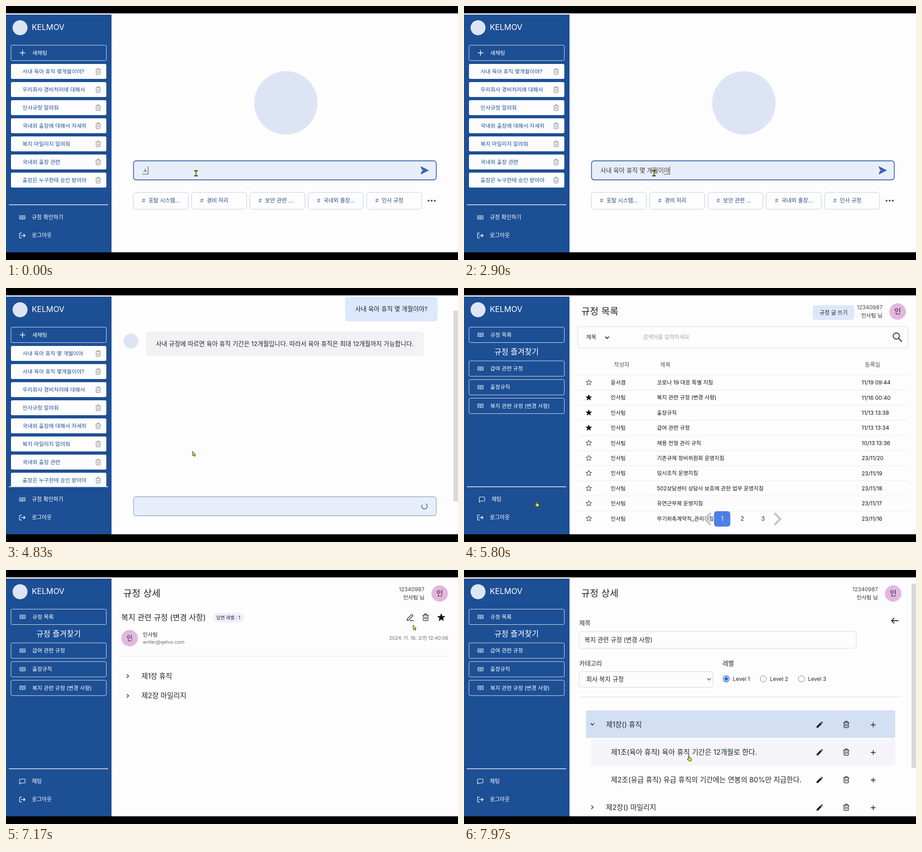
Animation, 998 px wide and 561 px high, one loop 8000 ms. Source, as an HTML page:

```html
<!DOCTYPE html>
<html lang="ko">
<head>
<meta charset="utf-8">
<title>사내 규정 챗봇</title>
<style>
  html, body { margin: 0; width: 100%; height: 100%; overflow: hidden; background: #000; }
  svg { display: block; width: 100vw; height: 100vh; }
  text { font-family: Inter, "Noto Sans CJK KR", "Noto Sans CJK JP", "Noto Sans CJK", sans-serif; white-space: pre; }
</style>
</head>
<body>
<svg id="stage" viewBox="0 0 998 561" xmlns="http://www.w3.org/2000/svg"></svg>
<script>
const LOOP = 8000, BLUE = '#1d4f95', INK = '#23262d', PALE = '#dde5f5';

// ---------- drawing helpers ----------
const T = (x, cy, size, str, more = '') =>
  `<text x="${x}" y="${(cy + size * 0.36).toFixed(2)}" font-size="${size}" ${more}>${str}</text>`;
const R = (x, y, x2, y2, r, more) =>
  `<rect x="${x}" y="${y}" width="${x2 - x}" height="${y2 - y}" rx="${r}" ${more}/>`;
const G = (id, body, more = '') => `<g id="${id}" ${more}>${body}</g>`;
const P = (d, color, w = 1.3, more = '') =>
  `<path d="${d}" fill="none" stroke="${color}" stroke-width="${w}" stroke-linecap="round" stroke-linejoin="round" ${more}/>`;
const at = (x, y, body, k = 1) => `<g transform="translate(${x} ${y}) scale(${k})">${body}</g>`;
const dot = (x, y, r, color) => `<circle cx="${x}" cy="${y}" r="${r}" fill="${color}"/>`;
const rule = (x, x2, y, color) => P(`M${x} ${y}H${x2}`, color, 1);

// ---------- icons, centred on the given point ----------
const trash = (x, y, color, k = 1) => at(x, y,
  P('M-5.5 -4H5.5M-2 -4V-6.3H2V-4M-4.4 -4V5Q-4.4 6.4 -3 6.4H3Q4.4 6.4 4.4 5V-4M-1.5 -1V3.5M1.5 -1V3.5', color, 1.2), k);
const book = (x, y) => at(x, y,
  P('M0 -3.6Q-3 -4.6 -6 -4V3.6Q-3 3 0 4Q3 3 6 3.6V-4Q3 -4.6 0 -3.6V4M-4.4 -1.7H-1.6M-4.4 .6H-1.6M1.6 -1.7H4.4M1.6 .6H4.4', '#dfe8f5', 1.1));
const plus = (x, y, color, r, w) => P(`M${x - r} ${y}h${2 * r}M${x} ${y - r}v${2 * r}`, color, w);
const logout = at(36, 507, P('M-2 -5.5H-4.5Q-6 -5.5 -6 -4V4Q-6 5.5 -4.5 5.5H-2M-2 0H6M3.2 -3L6.2 0L3.2 3', '#fff', 1.3));
const bubble = at(36, 467, P('M-6 6V-4Q-6 -5.5 -4.5 -5.5H4.5Q6 -5.5 6 -4V2Q6 3.5 4.5 3.5H-3.5Z', '#fff', 1.1));
const send = (x, y) => at(x, y, '<path d="M-8 -8.5L9 0L-8 8.5L-5.2 1.3L2 0L-5.2 -1.3Z" fill="#3f62ab" stroke="#3f62ab" stroke-linejoin="round"/>');
const starPath = Array.from({ length: 10 }, (_, i) => {
  const r = i % 2 ? 2.8 : 6.6, a = i * Math.PI / 5 - Math.PI / 2;
  return (i ? 'L' : 'M') + (r * Math.cos(a)).toFixed(2) + ' ' + (r * Math.sin(a)).toFixed(2);
}).join('') + 'Z';
const star = (x, y, full, k = 1) => at(x, y,
  `<path d="${starPath}" fill="${full ? '#111' : 'none'}" stroke="#222" stroke-width="1" stroke-linejoin="round"/>`, k);
const pencil = (x, y) => at(x, y,
  '<path d="M-6.5 6.5V3.5L2.2 -5.2L5.2 -2.2L-3.5 6.5ZM3.2 -6.2L4.4 -7.2Q5 -7.5 5.6 -7L7 -5.6Q7.5 -5 7.1 -4.4L6.1 -3.2Z" fill="#16181d"/>');
const pen = (x, y) => at(x, y, P('M-6.5 6.5L-5.6 2.6L3 -6Q4.4 -7.2 5.7 -5.9Q7 -4.6 5.8 -3.2L-2.7 5.4ZM0 6.8H7.5', INK, 1.4));
const arrowR = (x, y) => P(`M${x - 2} ${y - 3.5}l3.8 3.5l-3.8 3.5`, INK, 1.6);
const arrowD = (x, y, w = 1.6) => P(`M${x - 3.5} ${y - 2}l3.5 3.6l3.5 -3.6`, INK, w);

// ---------- sidebar ----------
const sideButton = (y, label, icon) =>
  R(11, y, 221.5, y + 34, 3, 'fill="none" stroke="#dbe5f4" stroke-width="1"') + icon(36.5, y + 17) + T(58, y + 17, 11.9, label);
const chats = ['사내 육아 휴직 몇 개월이야', '사내 육아 휴직 몇개월이야?', '우리회사 경비처리에 대해서', '인사규정 알려줘',
  '국내외 출장에 대해서 자세히', '복지 마일리지 알려줘', '국내외 출장 관련', '출장은 누구한테 승인 받아야'];
const chatItem = (label, i) => {
  const y = 128 + 40 * i;
  return R(11, y, 221.5, y + 33, 3, 'fill="#fdfdfe"') + T(36.5, y + 16.5, 11.9, label, `fill="${BLUE}"`) + trash(203.5, y + 16.5, '#8d8f96');
};
const side = R(0, 19, 233, 544, 0, `fill="${BLUE}"`) + dot(31, 48, 16.5, PALE) + T(57, 47, 17.3, 'KELMOV') +
  G('sideChat',
    sideButton(86.5, '새채팅', (x, y) => plus(x, y, '#fff', 5.5, 1.5)) +
    `<g clip-path="url(#listClip)">${G('history', chats.map(chatItem).join(''))}</g>` +
    G('footRules', book(36, 467) + T(57, 467, 12, '규정 확인하기'))) +
  G('sideRules',
    sideButton(86.5, '규정 목록', book) + T(116, 141, 16.9, '규정 즐겨찾기', 'text-anchor="middle"') +
    ['급여 관련 규정', '출장규칙', '복지 관련 규정 (변경 사항)'].map((s, i) => sideButton(161 + 41.2 * i, s, book)).join('') +
    G('footChat', bubble + T(57, 467, 12, '채팅'))) +
  P('M7 439H225', '#f2f5fa', 1.6) + logout + T(57, 507, 12, '로그아웃');

// ---------- pages ----------
const chip = (s, i) => {
  const x = 281 + 128.8 * i;
  return R(x, 411.5, x + 121.5, 449, 6, 'fill="#fdfdfe" stroke="#c0c9e2" stroke-width="1"') +
    T(x + 19, 430, 12, '#', 'fill="#56719f"') + T(x + 33.5, 430, 12.05, s, 'fill="#2c4a80"');
};
const home = dot(618, 214, 70, PALE) +
  R(281.5, 342, 950, 384, 6, 'fill="#e8eef9" stroke="#426aae" stroke-width="1.8"') + send(924, 363) +
  '<text id="typed" x="301" y="368" font-size="13.6" fill="#3a3d44"/>' +
  P('M0 0', '#444', 1, 'id="compose"') + P('M0 0', '#333', 1, 'id="caret"') +
  ['포탈 시스템...', '경비 처리', '보안 관련 ...', '국내외 출장...', '인사 규정'].map(chip).join('') +
  [933, 939.8, 946.6].map(x => dot(x, 430, 2.1, '#2a4d8f')).join('');

const scrollbar = (y, y2) => R(988, y, 998, y2, 0, 'fill="#d9d9da"');
const question = '사내 육아 휴직 몇 개월이야?';
const answer = '사내 규정에 따르면 육아 휴직 기간은 12개월입니다. 따라서 육아 휴직은 최대 12개월까지 가능합니다.';
const chat = scrollbar(50, 471) +
  R(749, 20, 953, 73.5, 6, 'fill="#dce8fb"') + T(771, 46.5, 13.6, question) +
  G('reply', dot(276, 117, 16.5, PALE) + R(309, 96, 400, 150, 6, 'id="replyBox" fill="#f2f2f5"') +
    T(331, 123, 13.6, '', 'id="replyText"')) +
  R(281.5, 461, 950, 503, 6, 'fill="#e8eef9" stroke="#a6bede" stroke-width="1.8"') +
  P('M4.3 -4.3A6.1 6.1 0 1 1 -4.3 -4.3', '#3f62ab', 1.6, 'id="spinner"') + G('sendChat', send(924, 482));

const user = dx => at(dx, 0, T(924, 43, 12, '12340987', 'text-anchor="end" fill="#444"') +
  T(924, 61, 11.9, '인사팀 님', 'text-anchor="end"') + dot(957.5, 52, 18.2, '#e3b6df') + T(957.5, 51.5, 16, '인', 'text-anchor="middle"'));

const HR = '인사팀';
const rows = [
  ['윤서겸', '코로나 19 대응 특별 지침', '11/19 09:44'], [HR, '복지 관련 규정 (변경 사항)', '11/16 00:40'],
  [HR, '출장규칙', '11/13 13:38'], [HR, '급여 관련 규정', '11/13 13:34'], [HR, '채용 전형 관리 규칙', '10/13 13:36'],
  [HR, '기존규제 정비위원회 운영지침', '23/11/20'], [HR, '임시조직 운영지침', '23/11/19'],
  [HR, '502상담센터 상담사 보호에 관한 업무 운영지침', '23/11/18'], [HR, '유연근무제 운영지침', '23/11/17'],
  [HR, '무기위촉계약직_관리지침', '23/11/16']];
const list = T(259, 52, 20.7, '규정 목록') + R(770, 38, 862, 70.5, 6, 'fill="#dce7f8"') + T(785, 54.5, 12, '규정 글 쓰기') + user(0) +
  R(251.5, 85, 980, 133, 5, 'fill="#fdfdfe" stroke="#d3d9e6" stroke-width="1.2"') +
  T(270, 109, 12, '제목') + arrowD(316, 110, 1.9) + T(395, 109, 12, '검색어를 입력하세요', 'fill="#a3a5aa"') +
  '<circle cx="954.5" cy="106" r="6.8" fill="none" stroke="#555" stroke-width="2.4"/>' + P('M959.8 111.3L966 117.8', '#555', 2.8) +
  T(331, 169.5, 12.4, '작성자', 'fill="#555"') + T(433, 169.5, 12.4, '제목', 'fill="#555"') + T(885, 169.5, 12.4, '등록일', 'fill="#555"') +
  rows.map(([who, title, date], i) => {
    const y = 208.8 + 33.4 * i;
    return rule(251, 980, y - 16.8, '#e9eaee') + star(275.5, y, i > 0 && i < 4) +
      T(324, y, 11.9, who, 'fill="#111"') + T(426, y, 11.9, title, 'fill="#111"') + T(878, y, 12, date, 'fill="#111"');
  }).join('') +
  P('M544.5 497L532.5 510L544.5 523', '#c8cad2', 5, 'style="stroke-linecap:butt;stroke-linejoin:miter"') +
  P('M685.5 497L698.5 510L685.5 523', '#c8cad2', 5, 'style="stroke-linecap:butt;stroke-linejoin:miter"') +
  R(552, 493, 588, 527, 6, 'fill="#4d80e6"') +
  [[570, '#fff'], [614.5, INK], [660, INK]].map(([x, c], i) => T(x, 510, 12.4, i + 1, `text-anchor="middle" fill="${c}"`)).join('');

const detail = T(259, 52, 20.7, '규정 상세') + user(0) + T(254.5, 105, 16.9, '복지 관련 규정 (변경 사항)') +
  R(457, 94.5, 525.5, 115.5, 10.5, 'fill="#eeeffa"') + T(464.5, 105, 10.1, '답변 레벨 : 1') +
  pen(892, 105) + trash(926.5, 104.5, INK, 1.15) + star(961, 105, true, 1.25) +
  dot(273, 150.5, 18.2, '#e3b6df') + T(273, 150, 13.6, '인', 'text-anchor="middle"') +
  T(302, 143, 11.9, HR) + T(302, 159, 10.7, 'writer@qelvo.com', 'fill="#696c74"') +
  T(976.5, 150, 10.7, '2024. 11. 16. 오전 12:40:06', 'text-anchor="end" fill="#696c74"') + rule(255, 976, 190.5, '#dcdde2') +
  arrowR(269, 234.5) + T(299, 234, 15.5, '제1장 휴직') + arrowR(269, 278) + T(299, 277.5, 15.5, '제2장 마일리지');

const tools = y => pencil(785, y + 1) + trash(844, y, '#16181d', 1.1) + plus(903.5, y + 1, '#16181d', 4.8, 1.5);
const radio = (x, i) => (i ? `<circle cx="${x}" cy="240.5" r="6.8" fill="#fff" stroke="#777" stroke-width="1"/>` :
  `<circle cx="${x}" cy="240.5" r="6.6" fill="#fff" stroke="#2f6fe0" stroke-width="1.6"/>` + dot(x, 240.5, 4.2, '#2f6fe0')) +
  T(x + 14.5, 240.5, 11.9, 'Level ' + (i + 1));
const edit = scrollbar(30, 437) + T(259, 52, 20.7, '규정 상세') + user(-10) +
  P('M958.5 112H944M949.5 106.5L944 112L949.5 117.5', INK, 1.8) +
  T(254.5, 117.5, 13.6, '제목') + R(254.5, 136, 866, 173, 5, 'fill="#fdfdfe" stroke="#d4d6dc"') + T(266, 154.5, 13.6, '복지 관련 규정 (변경 사항)') +
  T(254.5, 206, 13.6, '카테고리') + R(254.5, 224.5, 549.5, 259, 5, 'fill="#fdfdfe" stroke="#d0d3da"') +
  T(270, 241.5, 13.6, '회사 복지 규정') + arrowD(541, 241.5, 1.1) +
  T(571, 206, 13.6, '레벨') + [579, 661, 745].map(radio).join('') + rule(255, 966, 280.5, '#dcdde2') +
  R(269, 310, 952, 371, 3, 'id="chapterBg" fill="#d3dff2"') +
  G('closed', arrowR(283.5, 341)) + G('opened', arrowD(283.5, 341)) + T(313.5, 341, 15.5, '제1장() 휴직') + tools(341) +
  `<g clip-path="url(#foldClip)">` +
  R(280.5, 374, 952, 432, 3, 'id="articleBg" fill="#f4f4fa"') +
  T(324.5, 402, 15.6, '제1조(육아 휴직) 육아 휴직 기간은 12개월로 한다.') + tools(402) +
  T(324.5, 463, 15.6, '제2조(유급 휴직) 유급 휴직의 기간에는 연봉의 80%만 지급한다.') + tools(463) + '</g>' +
  G('chapter2', arrowR(283.5, 524) + T(313.5, 524, 15.5, '제2장() 마일리지') + tools(524));

// ---------- pointer, hot spot at 0,0 ----------
const LIME = '#d6f01c', lineStyle = 'stroke="#2b3010" stroke-width="1" stroke-linejoin="round"';
const pointer =
  G('beam', P('M-3 -5.5H3M0 -5.5V5.5M-3 5.5H3', '#3d4412', 2.4) + P('M0 -4.5V4.5', LIME, .8)) +
  G('arrow', `<path d="M0 0V10L2.4 7.8L4 11L5.8 10.2L4.3 7.1H7Z" fill="${LIME}" ${lineStyle}/>`) +
  G('hand', `<path d="M-1 .6Q0 -.5 1 .6V4.3L5 5.1Q6 5.5 5.8 7L5 11.4H-.2L-3.4 7.6Q-3.6 6 -2.2 6.2L-1 7.3Z" fill="${LIME}" ${lineStyle}/>`);

const stage = document.getElementById('stage');
stage.innerHTML =
  `<defs><clipPath id="listClip">${R(0, 124, 233, 438.5, 0, '')}</clipPath>
   <clipPath id="foldClip">${R(260, 371.5, 980, 493.5, 0, 'id="fold"')}</clipPath></defs>` +
  R(0, 0, 998, 561, 0, 'fill="#000"') + R(0, 16.5, 998, 544, 0, 'fill="#fdfdfe"') + R(0, 16.5, 998, 19, 0, 'fill="#f8f1f5"') +
  `<g fill="#fff">${side}</g><g fill="${INK}">` +
  G('home', home) + G('chat', chat) + G('list', list) + G('detail', detail) + G('edit', edit) + '</g>' + G('pointer', pointer) +
  R(0, 544.5, 998, 561, 0, 'fill="#000"');

const el = {};
stage.querySelectorAll('[id]').forEach(n => el[n.id] = n);
const show = (id, on) => { el[id].style.display = on ? '' : 'none'; };
const setText = (id, s) => { if (el[id].textContent !== s) el[id].textContent = s; };
const move = (id, x, y, more = '') => el[id].setAttribute('transform', `translate(${x} ${y}) ${more}`);

// ---------- timeline ----------
const scenes = [['home', 0], ['chat', 3060], ['list', 5600], ['detail', 6480], ['edit', 7380]];
const REPLY = 3540, SAVED = 4760, DONE = 4950, OPEN = 7780;

// Every keystroke of the Korean input method, word by word.
const words = [
  ['ㅅ', '사', '산', '사내'], ['ㅇ', '유', '육', '육ㅇ', '육아'], ['ㅎ', '휴', '\ud74a', '휴지', '휴직'], ['ㅁ', '며', '몇'],
  ['ㄱ', '개', '갱', '개우', '개워', '개월', '개월ㅇ', '개월이', '개월잉', '개월이야', '개월이야?']];
const strokes = [];
words.reduce((done, word, i) => {
  word.forEach(w => strokes.push(done + w));
  const next = done + word[word.length - 1] + ' ';
  if (i < words.length - 1) strokes.push(next);
  return next;
}, '');

// time, x, y, pointer shape from then on
const track = [
  [0, 419.5, 369.5, 'beam'], [3059, 419.5, 369.5, 'beam'], [3060, 412, 361, 'arrow'], [5200, 412, 361, 'arrow'],
  [5480, 160, 471.5, 'hand'], [5850, 160, 471.5, 'hand'], [5990, 240, 415, 'arrow'], [6060, 300, 370, 'hand'],
  [6330, 480, 240, 'hand'], [6500, 480, 240, 'arrow'], [6640, 500, 235, 'arrow'], [7120, 899, 122, 'arrow'],
  [7180, 899, 122, 'arrow'], [7270, 892, 106, 'hand'], [7400, 892, 106, 'arrow'], [7660, 505, 345, 'hand'],
  [7800, 505, 345, 'hand'], [7950, 496.5, 410.5, 'hand'], [8000, 496.5, 410.5, 'hand']];
const clamp = v => Math.max(0, Math.min(1, v));
const ease = v => { v = clamp(v); return v * v * (3 - 2 * v); };

function drawPointer(t) {
  let i = 0;
  while (i < track.length - 2 && t >= track[i + 1][0]) i++;
  const [t0, x0, y0, shape] = track[i], [t1, x1, y1] = track[i + 1], k = ease((t - t0) / (t1 - t0));
  const x = x0 + (x1 - x0) * k, y = y0 + (y1 - y0) * k;
  move('pointer', x, y);
  ['beam', 'arrow', 'hand'].forEach(s => show(s, s === shape));
  return y;
}

function drawTyping(t) {
  const s = strokes[Math.min(strokes.length - 1, Math.floor(t / 94))];
  setText('typed', s);
  const end = 301 + el.typed.getComputedTextLength();
  const last = el.typed.getSubStringLength(s.length - 1, 1);
  el.caret.setAttribute('d', `M${end + .5} 355V371.5`);
  el.compose.setAttribute('d', `M${end - last} 371.5H${end}`);
  show('compose', !/[ ?]$/.test(s));
}

function drawReply(t) {
  show('reply', t >= REPLY);
  if (t >= REPLY) {
    setText('replyText', answer.slice(0, Math.floor((t - REPLY) / 21)));
    el.replyBox.setAttribute('width', el.replyText.getComputedTextLength() + 44);
  }
  show('spinner', t < DONE);
  show('sendChat', t >= DONE);
  move('spinner', 924, 482, `rotate(${(t - 3830) * 0.48 + 225})`);
}

function drawFold(t, y) {
  const p = ease((t - OPEN) / 150), open = t >= OPEN;
  el.fold.setAttribute('height', 122 * p);
  move('chapter2', 0, -122 * (1 - p));
  show('opened', open);
  show('closed', !open);
  show('chapterBg', open || (y > 310 && y < 371));
  show('articleBg', y > 374);
}

function render(t) {
  const scene = scenes.filter(s => t >= s[1]).pop()[0];
  scenes.forEach(([id]) => show(id, id === scene));
  const chatting = scene === 'home' || scene === 'chat';
  show('sideChat', chatting);
  show('sideRules', !chatting);
  move('history', 0, t < SAVED ? -40 : 0);
  const hover = 3.7 * (ease((t - 5430) / 150) - ease((t - 5870) / 150));
  move('footRules', hover, 0);
  move('footChat', hover, 0);
  const y = drawPointer(t);
  if (scene === 'home') drawTyping(t);
  if (scene === 'chat') drawReply(t);
  if (scene === 'edit') drawFold(t, y);
}

const start = performance.now();
function tick() {
  render((performance.now() - start) % LOOP);
  requestAnimationFrame(tick);
}
tick();
</script>
</body>
</html>
```
